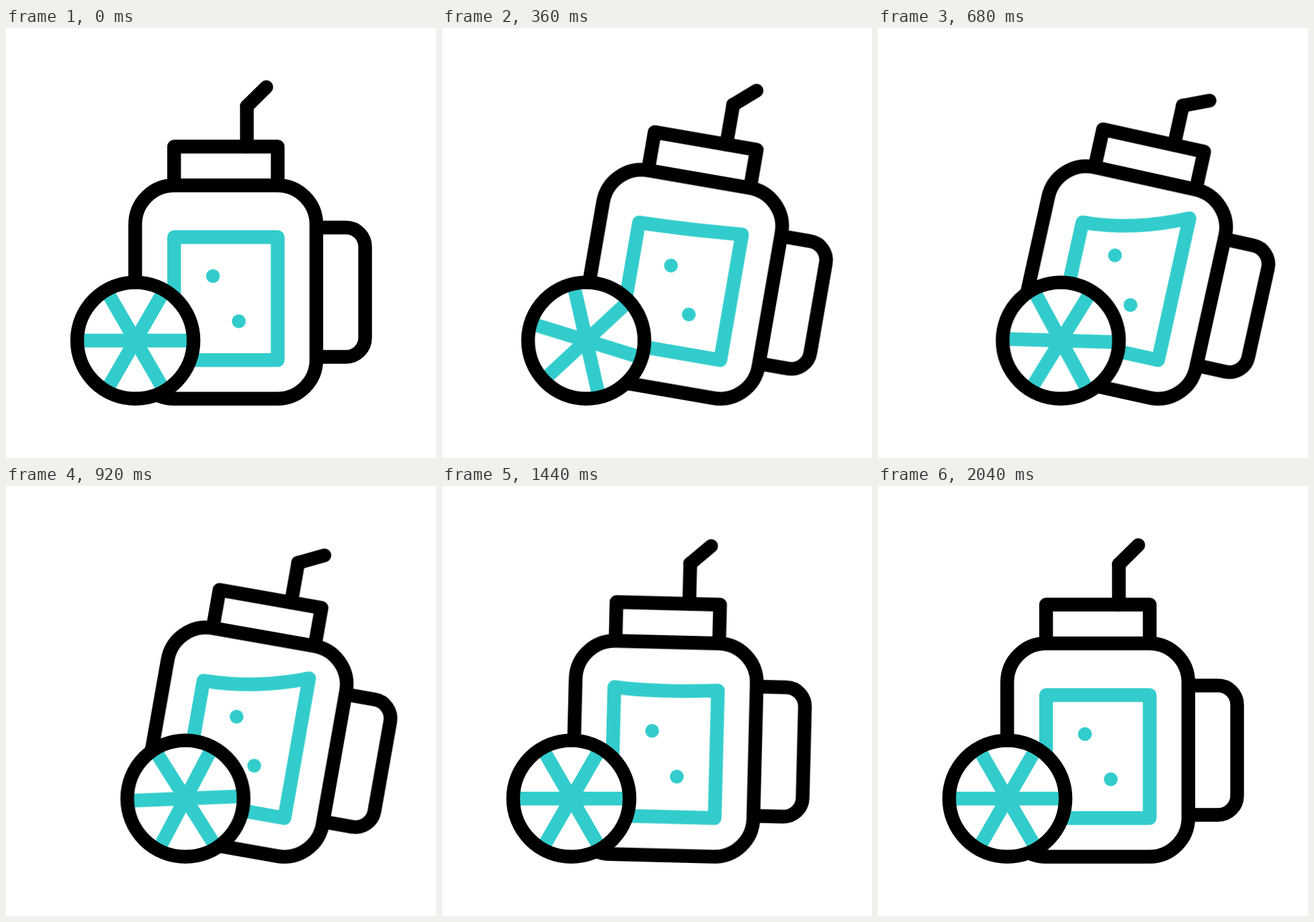
An HTML page that plays this animation: 640x640 px, repeating every 2240 ms.

```html
<!DOCTYPE html>
<html lang="en">
<head>
<meta charset="utf-8">
<title>Lemonade jar</title>
<style>
  html, body { margin: 0; width: 100%; height: 100%; overflow: hidden; background: #fff; }
  svg { display: block; width: 100vw; height: 100vh; }

  .ink, .teal {
    fill: none;
    stroke: #000;
    stroke-width: 20.4;
    stroke-linecap: round;
    stroke-linejoin: round;
  }
  .teal { stroke: #33cccc; }
  .bubbles { fill: #33cccc; }

  .jar, .tip, .label, .bubbles, .slice, .spokes {
    animation: 2240ms cubic-bezier(.333, 0, .667, 1) infinite;
  }
  .jar     { animation-name: tilt;  transform-origin: 404px 494px; }
  .tip     { animation-name: bend;  transform-origin: 358.5px 116.5px; }
  .label   { animation-name: slosh; }
  .bubbles { animation-name: float; }
  .slice   { animation-name: slide; }
  .spokes  { animation-name: spin;  transform-origin: 192.5px 465.2px; }

  /* The jar rolls on its rounded bottom corner. */
  @keyframes tilt {
    0%, 3.57%       { transform: translateX(0) rotate(0deg); }
    24.33%, 25.89%  { transform: translateX(15.2px) rotate(15deg); }
    34.82%, 54.15%  { transform: translateX(10.1px) rotate(10deg); }
    67.54%, 100%    { transform: translateX(0) rotate(0deg); }
  }

  @keyframes bend {
    0%, 12.5%       { transform: rotate(0deg); }
    26.79%          { transform: rotate(23deg); }
    35.71%, 55.36%  { transform: rotate(18.8deg); }
    72.32%          { transform: rotate(-10deg); }
    79.46%, 100%    { transform: rotate(0deg); }
  }

  @keyframes slosh {
    0%, 11.61%      { d: path("M250.2 494.2 L250.2 311.3 Q308 311.3 404.4 311.3 L404.4 494.2 Z"); }
    27.68%          { d: path("M250.2 494.2 L250.2 320 Q327 315 404.4 276 L404.4 494.2 Z"); }
    35.71%, 55.36%  { d: path("M250.2 494.2 L250.2 313.6 Q327 313 404.4 283 L404.4 494.2 Z"); }
    70.98%          { d: path("M250.2 494.2 L250.2 296 Q300 307.5 404.4 318 L404.4 494.2 Z"); }
    87.5%, 100%     { d: path("M250.2 494.2 L250.2 311.3 Q308 311.3 404.4 311.3 L404.4 494.2 Z"); }
  }

  @keyframes float {
    0%, 13.39%      { transform: translateY(0); }
    28.57%          { transform: translateY(-13.5px); }
    77.68%, 100%    { transform: translateY(0); }
  }

  @keyframes slide {
    0%, 7.99%       { transform: translateX(0); }
    31.43%, 37.86%  { transform: translateX(80px); }
    58.21%, 100%    { transform: translateX(0); }
  }

  @keyframes spin {
    0%, 7.99%       { transform: rotate(0deg); }
    31.43%, 37.86%  { transform: rotate(62deg); }
    58.21%, 100%    { transform: rotate(0deg); }
  }
</style>
</head>
<body>
<svg viewBox="0 0 640 640">
  <g class="jar">
    <path class="teal label" d="M250.2 494.2 L250.2 311.3 Q308 311.3 404.4 311.3 L404.4 494.2 Z"/>
    <g class="bubbles">
      <circle cx="308" cy="369.2" r="10.3"/>
      <circle cx="346.5" cy="436.5" r="10.3"/>
    </g>
    <g class="ink">
      <path d="M462 297H506A28.5 28.5 0 0 1 534.5 325.5V461A28.5 28.5 0 0 1 506 489.5H462"/>
      <rect x="192.3" y="234.2" width="269.6" height="317.6" rx="58"/>
      <path d="M250.2 234V176.5H404.4V234"/>
      <path d="M358.5 176.5V116.5"/>
      <path class="tip" d="M358.5 116.5L387.4 88"/>
    </g>
  </g>
  <g class="slice">
    <circle cx="192.5" cy="465.2" r="86.6" fill="#fff"/>
    <g class="teal spokes">
      <path id="spoke" d="M116 465.2H269"/>
      <use href="#spoke" transform="rotate(60 192.5 465.2)"/>
      <use href="#spoke" transform="rotate(120 192.5 465.2)"/>
    </g>
    <circle class="ink" cx="192.5" cy="465.2" r="86.6"/>
  </g>
</svg>
</body>
</html>
```
